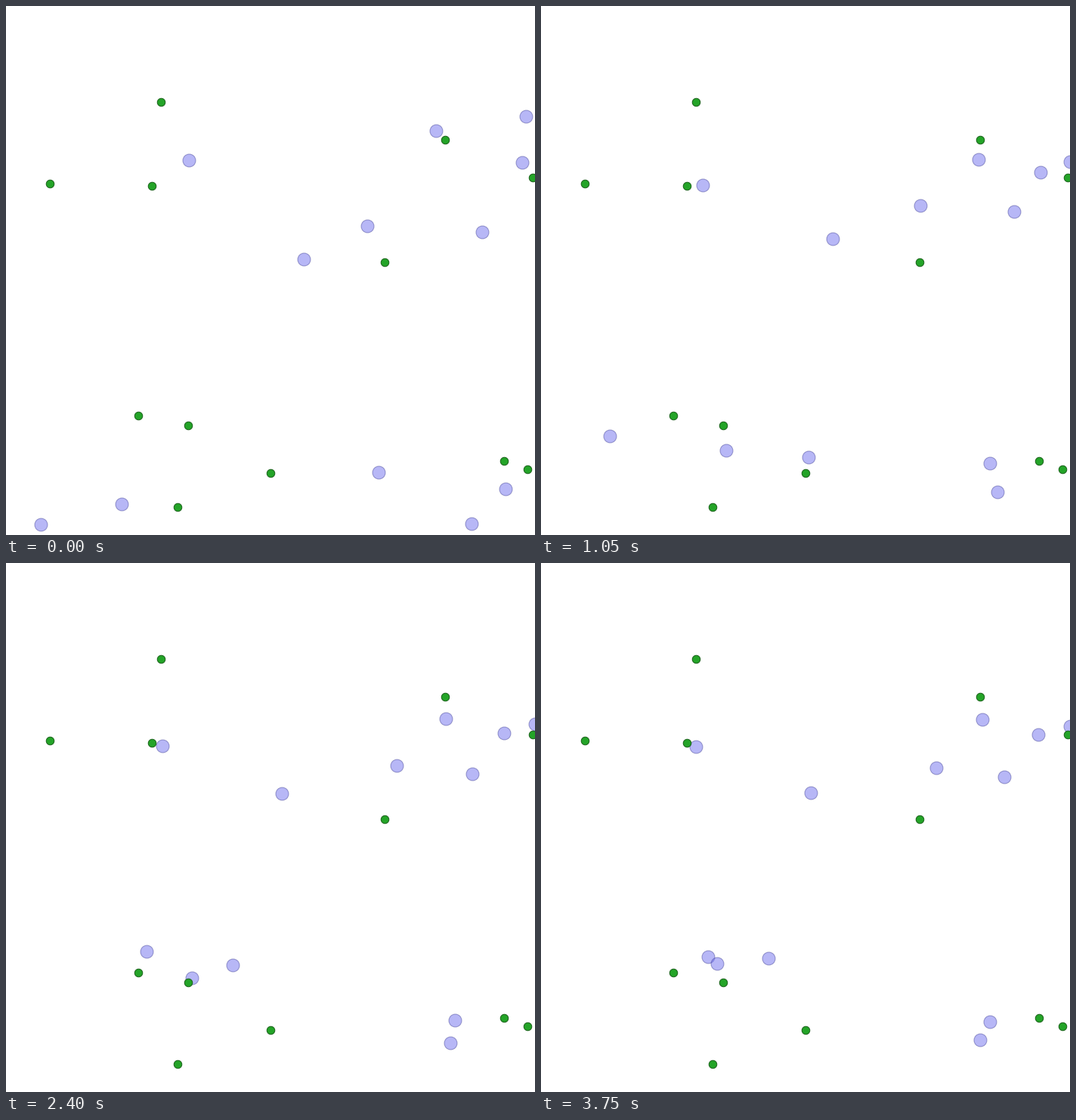
Write a matplotlib script that moves like this. It is 700 by 700 pixels and loops after 3900 ms.

```python
import numpy as np
import matplotlib.pyplot as plt
from matplotlib.animation import FuncAnimation

SIZE, DPI = 700, 100
FRAMES, STEP_MS = 26, 150
PX = 72 / DPI

FOOD = [(205, 127), (58, 235), (193, 238), (581, 177.5), (697, 227),
        (501, 339.5), (175.5, 542), (241, 555), (350, 618), (227, 663.5),
        (659, 602), (690, 613)]

# Start, turning point and resting place of each walker
NEAR = [
    [(242, 204.5), (215, 238), (206.5, 242.5)],
    [(569, 165), (579, 205), (586, 208.5)],
    [(688.5, 146.5), (701, 208), (700, 215)],
    [(683, 207), (661, 220), (659, 228)],
    [(478, 291.5), (500, 262), (525, 270)],
    [(630.5, 299), (629, 269), (615, 282)],
    [(394, 335.5), (391, 308), (355, 305)],
    [(661.5, 639), (606, 646), (583, 630)],
    [(616.5, 685), (593, 601), (596, 609)],
]
FAR = [
    [(46, 686), (92, 478), (224, 521)],
    [(153.5, 659), (313, 545), (301, 525)],
    [(493.5, 617.5), (265, 600), (232, 530)],
]
START, TURN, REST = np.swapaxes(np.array(NEAR + FAR, float), 0, 1)

# Steps needed to reach the turning point
PACE = np.repeat([3.6, 7.5], [len(NEAR), len(FAR)])[:, None]

rng = np.random.default_rng(4)
PHASE = rng.uniform(0, 2 * np.pi, START.shape)
WOBBLE, PERIOD = 1.5, 9


def settle(step, pace, power):
    """Rise smoothly from 0 towards 1."""
    return 1 - np.exp(-(step / pace) ** power)


def positions(step):
    approach = settle(step, PACE, 1.75)
    drift = settle(step, 14.5, 2.6)
    wobble = WOBBLE * np.sin(2 * np.pi * step / PERIOD + PHASE)
    return (START + (TURN - START) * approach + (REST - TURN) * drift
            + wobble * drift)


fig = plt.figure(figsize=(SIZE / DPI, SIZE / DPI), dpi=DPI, facecolor="white")
ax = fig.add_axes([0, 0, 1, 1])
ax.set_xlim(0.5, SIZE + 0.5)
ax.set_ylim(SIZE + 0.5, 0.5)
ax.axis("off")


def dots(points, diameter, face, edge, z):
    x, y = np.transpose(points)
    return ax.scatter(x, y, s=(diameter * PX) ** 2, facecolors=[face],
                      edgecolors=[edge], linewidths=PX, zorder=z, snap=False)


walkers = dots(positions(0), 17, (0.443, 0.443, 0.937, 0.5),
               (0.2, 0.2, 0.55, 0.45), 1)
dots(FOOD, 10.5, "#24a428", "#176017", 2)


def update(step):
    walkers.set_offsets(positions(step))
    return (walkers,)


anim = FuncAnimation(fig, update, frames=FRAMES, interval=STEP_MS,
                     repeat=True, repeat_delay=0)
plt.show()
```
